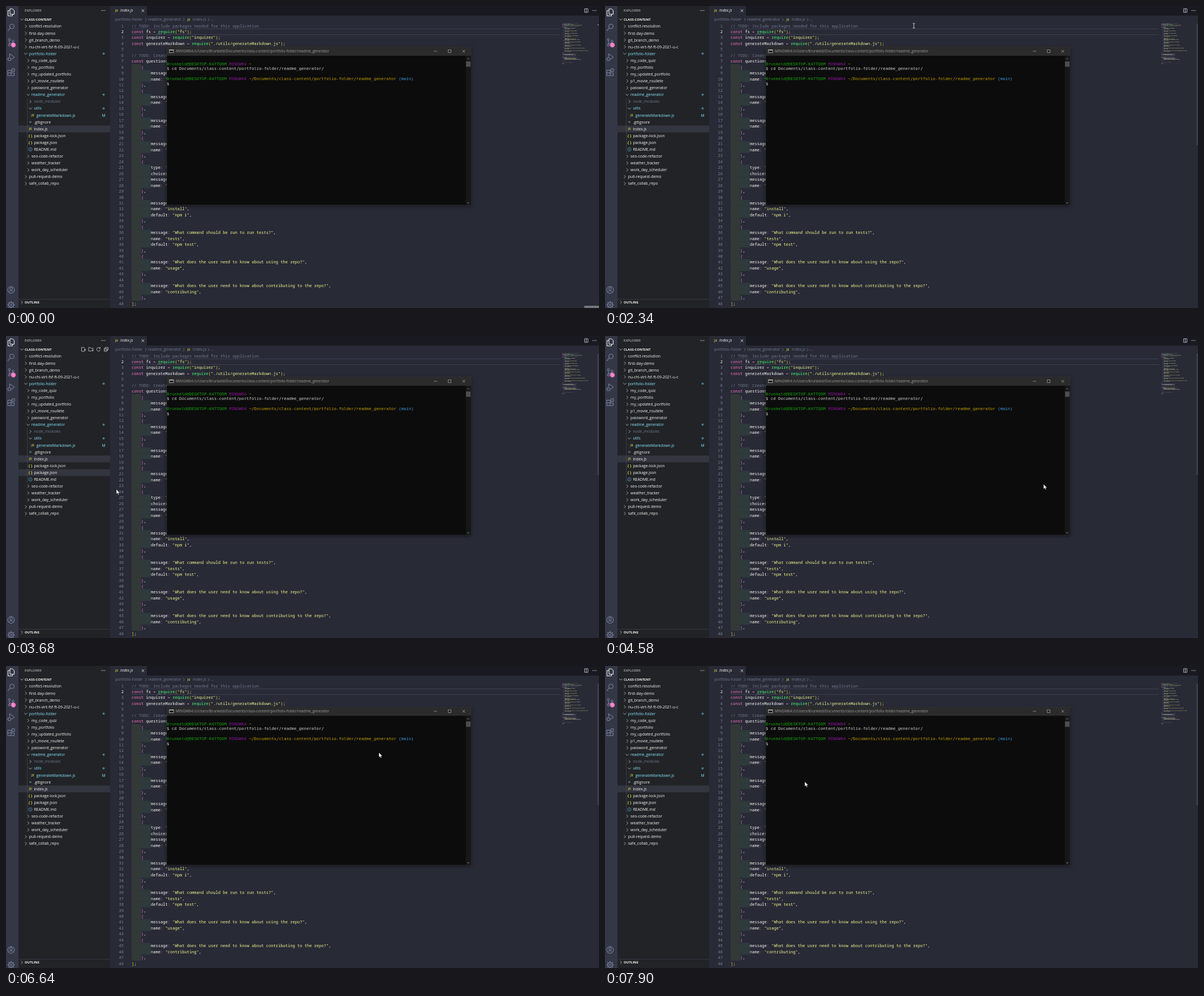
These frames come from a looping animation (1048 px wide and 534 px high, 8000 ms). An HTML page with a canvas:

```html
<!DOCTYPE html>
<html lang="en">
<head>
<meta charset="utf-8">
<title>Editor and terminal</title>
<style>
html, body { margin: 0; width: 100%; height: 100%; overflow: hidden; background: #282a36; }
canvas { display: block; }
</style>
</head>
<body>
<canvas id="stage" width="1048" height="534"></canvas>
<script>
const ctx = document.getElementById("stage").getContext("2d");
const LOOP = 8000;
const UI = '"Open Sans", "Noto Sans", sans-serif';
const MONO = '"DejaVu Sans Mono", "Liberation Mono", monospace';
const CODE_FONT = '"Noto Sans Mono", "DejaVu Sans Mono", monospace';
const C = {
  fg: "#f8f8f2", dim: "#71788c", pink: "#ff79c6", green: "#50fa7b", yellow: "#f1fa8c",
  cyan: "#8be9fd", gold: "#ffd700", orchid: "#da70d6", icon: "#8189a8", js: "#cbcb41", row: "#33353f"
};
const USER = "Brunkeld", HOST = "DESKTOP-K47TQ6M";

// ---- drawing helpers ----
function rect(x, y, w, h, color) {
  ctx.fillStyle = color;
  ctx.fillRect(x, y, w, h);
}

// Shapes glyphs at 100px and scales down, so advances stay fractional.
function text(s, x, y, color, { size = 6.8, font = UI, style = "", align = "left" } = {}) {
  ctx.save();
  ctx.translate(x, y + size * 0.36);
  ctx.scale(size / 100, size / 100);
  ctx.font = `${style} 100px ${font}`;
  ctx.textAlign = align;
  ctx.fillStyle = color;
  ctx.fillText(s, 0, 0);
  ctx.restore();
}

function path(d, x, y, color, w = 1, fill) {
  ctx.save();
  ctx.translate(x, y);
  const p = new Path2D(d);
  if (fill) { ctx.fillStyle = fill; ctx.fill(p); }
  if (w) { ctx.strokeStyle = color; ctx.lineWidth = w; ctx.stroke(p); }
  ctx.restore();
}

function circle(x, y, r, color, w) {
  ctx.beginPath();
  ctx.arc(x, y, r, 0, Math.PI * 2);
  if (w) { ctx.strokeStyle = color; ctx.lineWidth = w; ctx.stroke(); }
  else { ctx.fillStyle = color; ctx.fill(); }
}

const chevron = (x, y, open, color = "#c5c6c6") =>
  path(open ? "M-2.7-1.3L0 1.4L2.7-1.3" : "M-1.3-2.7L1.4 0L-1.3 2.7", x, y, color, 0.8);
const dots = (x, y, color) => [-2.7, 0, 2.7].forEach(d => circle(x + d, y, 0.75, color));
const cross = (x, y, r, color) =>
  path(`M${-r} ${-r}L${r} ${r}M${r} ${-r}L${-r} ${r}`, x, y, color, 0.8);
const jsIcon = (x, y) => text("JS", x, y, C.js, { size: 5.4, style: "bold", align: "center" });

// ---- code ----
const item = (...fields) => ["    {", ...fields.map(f => `        ${f},`), "    },"];
const ask = (message, name, ...rest) => item(`message: "${message}"`, `name: "${name}"`, ...rest);
const CODE = [
  "// TODO: Include packages needed for this application",
  'const fs = require("fs");',
  'const inquirer = require("inquirer");',
  'const generateMarkdown = require("./utils/generateMarkdown.js");',
  "",
  "// TODO: Create an array of questions for user input",
  "const questions = [",
  ...ask("What is your username?", "username"),
  ...ask("What is your email address?", "email"),
  ...ask("What is your project's name?", "title"),
  ...ask("Please write a short description", "description"),
  ...item('type: "list"', 'choices: ["MIT", "APACHE", "None"]',
    'message: "What kind of license should it have?"', 'name: "license"'),
  ...ask("What command should be run to install?", "install", 'default: "npm i"'),
  ...ask("What command should be run to run tests?", "tests", 'default: "npm test"'),
  ...ask("What does the user need to know about using the repo?", "usage"),
  ...ask("What does the user need to know about contributing to the repo?", "contributing"),
  "];"
];
const TAIL = [
  "", "// TODO: Create a function to write README file",
  "function writeToFile(fileName, data) {", "    return fs.writeFileSync(fileName, data);", "}", "",
  "// TODO: Create a function to initialize app", "function init() {",
  "    inquirer.prompt(questions).then((answers) => {",
  '        console.log("Generating README...");',
  '        writeToFile("README.md", generateMarkdown(answers));', "    });", "}", "", "",
  "// Function call to initialize app", "", "init();"
];
const TOKEN = /(\/\/.*)|("[^"]*")|(\bconst\b|\bfunction\b|[=:])|(\brequire\b)|([{}])|([()[\]])|[\w.]+|\S/g;
const TINT = [C.dim, C.yellow, C.pink, C.green, C.orchid, C.gold];

function tokens(line) {
  return [...line.matchAll(TOKEN)].map(m => {
    const kind = m.slice(1).findIndex(Boolean);
    return { s: m[0], col: m.index, color: kind < 0 ? C.fg : TINT[kind] };
  });
}
const LINES = CODE.map(tokens);
const MINI = [...CODE, ...TAIL].map(tokens);

const CODE_X = 222, CHAR = 4.245, PITCH = 10.447;
const lineY = i => 35 + i * PITCH;
const code = { size: CHAR / 0.6, font: CODE_FONT };

function drawEditor(t) {
  rect(184, 0, 864, 534, "#282a36");
  rect(184, 0, 864, 17, "#191a21");
  rect(184, 0, 65, 17, "#282a36");
  jsIcon(195.5, 8);
  text("index.js", 202, 8, C.fg, { style: "italic" });
  cross(242, 8.3, 2.3, C.fg);
  path("M-3-3.2H3V3.2H-3ZM0-3.2V3.2", 1025.5, 8, "#d0d1d2", 0.8);
  dots(1040, 8, "#d0d1d2");

  text("portfolio-folder", 193, 24, C.dim);
  text("readme_generator", 251, 24, C.dim);
  jsIcon(323, 24);
  text("index.js", 330, 24, C.dim);
  text("...", 362, 24, C.dim);
  [247, 314, 358].forEach(x => chevron(x, 24, false, C.dim));

  // indent guides
  LINES.forEach((_, i) => {
    const depth = CODE[i].search(/\S/) / 4;
    const y = lineY(i) - PITCH / 2;
    if (depth >= 1) rect(CODE_X, y, 17, PITCH + 0.2, "#323937");
    if (depth >= 2) rect(CODE_X + 17, y, 17, PITCH + 0.2, "#2e3a3b");
  });

  rect(CODE_X, 40, 757, 0.8, "#44475a");
  rect(CODE_X, 50, 757, 0.8, "#44475a");

  LINES.forEach((line, i) => {
    const y = lineY(i);
    text(String(i + 1), 208, y, i === 1 ? C.fg : "#7c8299", { ...code, align: "right" });
    line.forEach(k => text(k.s, CODE_X + k.col * CHAR, y, k.color, code));
  });
  [268.5, 271, 273.5].forEach(x => rect(x, 49, 1, 1, "#b0b2b0"));

  drawMinimap();
  rect(1045, 33, 3, 1, "#8e9098");
  if (t >= 500) rect(1045, 31, 3, 215, "#3b3d49");
  if (t < 40) rect(1022, 530, 26, 4, "#74767d");
}

function drawMinimap() {
  const step = 0.5477;
  ctx.globalAlpha = 0.45;
  MINI.forEach((line, i) => line.forEach(k => {
    for (const w of k.s.matchAll(/\S+/g))
      rect(983 + (k.col + w.index) * step, 30.4 + i * step * 2, w[0].length * step, 0.8, k.color);
  }));
  ctx.globalAlpha = 1;
}

// ---- side bars ----
// Each row: depth, name, kind (closed, open, js, json, git, info), flag.
const TREE = [
  [0, "conflict-resolution"], [0, "first-day-demo"], [0, "git_branch_demo"],
  [0, "nu-chi-virt-fsf-ft-09-2021-u-c"], [0, "portfolio-folder", "open"],
  [1, "my_code_quiz"], [1, "my_portfolio"], [1, "my_updated_portfolio"],
  [1, "p1_movie_roullete"], [1, "password_generator"], [1, "readme_generator", "open"],
  [2, "node_modules", "closed", "dim"], [2, "utils", "open"], [3, "generateMarkdown.js", "js", "M"],
  [2, ".gitignore", "git"], [2, "index.js", "js"], [2, "package-lock.json", "json"],
  [2, "package.json", "json"], [2, "README.md", "info"], [1, "seo-code-refactor"],
  [1, "weather_tracker"], [1, "work_day_scheduler"], [0, "pull-request-demo"], [0, "safe_collab_repo"]
];
const ROW = 12.087, ROW_Y = 36, SELECTED = 15;

function rowIcon(kind, x, y) {
  if (kind === "js") jsIcon(x, y);
  else if (kind === "json") text("{ }", x, y, C.js, { size: 6.5, style: "bold", align: "center" });
  else if (kind === "git") rect(x - 1.7, y - 1.7, 3.4, 3.4, "#4f626b");
  else if (kind === "info") {
    circle(x, y, 3, "#519aba", 0.8);
    rect(x - 0.4, y - 0.4, 0.9, 2, "#519aba");
    rect(x - 0.4, y - 1.8, 0.9, 0.8, "#519aba");
  } else chevron(x, y, kind === "open");
}

function drawExplorer(pointer) {
  rect(22, 0, 162, 534, "#212327");
  const inside = pointer && pointer.x > 22 && pointer.x < 184;
  const hovered = inside ? Math.round((pointer.y - ROW_Y) / ROW) : -1;

  text("EXPLORER", 33, 8, "#dcdcd8", { size: 6.2 });
  dots(172, 8, "#d0d1d2");
  chevron(28, 23.7, true);
  text("CLASS-CONTENT", 33, 23.7, C.fg, { size: 5.9, style: "bold" });
  if (inside) drawHeaderIcons();

  TREE.forEach(([depth, name, kind = "closed", flag], i) => {
    const y = ROW_Y + i * ROW;
    if (i === SELECTED || i === hovered) rect(22, y - ROW / 2, 162, ROW, C.row);
    const x = 35 + depth * 4.3;
    const changed = kind === "open" || flag === "M";
    rowIcon(kind, depth > 1 ? x - 0.5 : x, y);
    text(name, x + 5.8, y, changed ? C.cyan : flag === "dim" ? C.dim : C.fg);
    if (kind === "open") circle(172.5, y, 2, "#4c7a88");
    if (flag === "M") text("M", 172.5, y, C.cyan, { size: 6.8, align: "center" });
  });
  rect(37.5, 163, 0.7, 97, "#4a4c58");
  rect(42, 187, 0.6, 12, "#3c3e49");

  rect(22, 518, 162, 0.8, "#3a3c48");
  chevron(28, 524, false);
  text("OUTLINE", 33, 524, C.fg, { size: 5.9, style: "bold" });
}

function drawHeaderIcons() {
  const c = "#d0d1d2", y = 23.5;
  path("M1-3.5H-3V3.5H2.5V2M1-3.5L2.5-2V0M1.5 1H5M3.2-.8V2.8", 136.5, y, c, 0.8);
  path("M-4-3H-1L0-2H4V0M-4-3V3H1M1 2H5M3 0V4", 150, y, c, 0.8);
  path("M2.5-2A3.2 3.2 0 1 0 3.2 .5M3-4V-1.5H.5", 163.5, y, c, 0.8);
  path("M-2-1V-3.3H3.5V1.5H1.5M-3.5-1H1.5V3.5H-3.5ZM-2.5 1.2H.5", 177, y, c, 0.8);
}

function drawActivityBar() {
  rect(0, 0, 22, 534, "#343746");
  const c = C.icon, x = 9;
  path("M-2-6H2.5L5.5-3V3.5H-2ZM-2-3H-5.5V6.5H2.5V3.5", x, 11, C.fg, 1);
  circle(10.5, 36, 4, c, 1);
  path("M-1.5 2L-6 7", x, 37, c, 1.1);
  circle(6, 59.5, 1.8, c, 1);
  circle(6, 69, 1.8, c, 1);
  circle(12.5, 62, 1.8, c, 1);
  path("M-3-2.8V3M3.5-.5C3.5 2-1 1.5-3 2.5", x, 64, c, 1);
  circle(13, 69, 4.2, "#ff79c6");
  text("1", 13, 69, C.fg, { size: 5, align: "center" });
  path("M-2.5-1V-6.5L6-.5L1 3", x, 91, c, 1);
  circle(6, 94, 2.6, c, 1);
  path("M2.4 94H.8M9.5 94H11M3 97.5L4.2 96.3M9 97.5L7.8 96.3M3 90.6L4.2 91.8", 0, 0, c, 0.8);
  path("M-6-3.5H0V6H-6ZM0 1.2H5.5V6H0M-6 1.2H0M1.5-6H6V-1.5H1.5Z", x, 117, c, 1);
  circle(x, 502, 6, c, 1);
  circle(x, 500, 2.3, c, 1);
  path("M-4 4C-3 .8 3 .8 4 4", x, 502, c, 1);
  circle(x, 528.5, 4.2, c, 1);
  circle(x, 528.5, 1.6, c, 1);
  for (let i = 0; i < 8; i++) {
    const a = i * Math.PI / 4, dx = Math.cos(a), dy = Math.sin(a);
    path(`M${dx * 4.2} ${dy * 4.2}L${dx * 6.2} ${dy * 6.2}`, x, 528.5, c, 1.7);
  }
}

// ---- terminal ----
const TERM_CHAR = 4.409;
const term = { size: TERM_CHAR / 0.602, font: MONO };
const PROJECT = "Documents/class-content/portfolio-folder/readme_generator";

function drawTerminal() {
  ctx.save();
  ctx.shadowColor = "rgba(0,0,0,.5)";
  ctx.shadowBlur = 6;
  ctx.shadowOffsetY = 2;
  rect(284, 72, 538, 280, "#0c0c0c");
  ctx.restore();
  rect(284, 72, 538, 16, "#2b2b2b");
  rect(288.5, 77, 8, 6, "#c8c8c8");
  rect(289.3, 78.6, 6.4, 3.6, "#111");
  text(`MINGW64:/c/Users/${USER}/${PROJECT}`, 300, 80, "#9b9b9b", { size: 6.43 });
  rect(756, 79.6, 6, 0.8, "#9b9b9b");
  path("M-2.5-2.5H2.5V2.5H-2.5Z", 784, 80, "#9b9b9b", 0.8);
  cross(809, 80, 2.5, "#9b9b9b");

  rect(812.5, 88, 9, 264, "#171717");
  rect(813, 98, 8, 9.5, "#4d4d4d");
  path("M-2 1L0-1L2 1", 817, 93.5, "#888", 0.9);
  path("M-2-1L0 1L2-1", 817, 348, "#888", 0.9);
  path("M0 0H538V280H0Z", 284, 72, "#3a3b3e", 0.5);

  const put = (s, col, y, color = "#cccccc") => text(s, 284 + col * TERM_CHAR, y, color, term);
  const prompt = (y, dir) => {
    put(`${USER}@${HOST}`, 0, y, "#13a10e");
    put("MINGW64", 25, y, "#881798");
    put(dir, 33, y, "#c19c00");
  };
  prompt(102, "~");
  put(`$ cd ${PROJECT}/`, 0, 110.8);
  prompt(128.4, `~/${PROJECT}`);
  put("(main)", 93, 128.4, "#3a96dd");
  put("$", 0, 137.2);
}

// ---- pointer ----
const WAY = [
  [380, 1028, 530], [700, 1008, 380], [940, 975, 240], [1140, 953, 168], [1240, 930, 152],
  [1280, 910, 142], [1380, 910, 142], [1700, 765, 70], [2000, 662, 38], [2100, 655, 37], [2880, 300, 30],
  [2980, 296, 29], [3220, 214, 86], [3340, 182, 150], [3480, 150, 222], [3580, 168, 241],
  [3680, 195, 271], [3760, 195, 271], [3800, 240, 294], [3950, 400, 372], [4150, 700, 392],
  [4330, 960, 330], [4450, 910, 280], [4580, 775, 262], [4680, 765, 255], [5100, 580, 170],
  [5460, 400, 95], [5560, 335.5, 108], [5580, 335.5, 108], [5720, 165, 200], [5850, 140, 320], [6000, 200, 415],
  [6180, 380, 433], [6320, 510, 395], [6420, 520, 385], [6640, 659, 153], [6740, 659, 153],
  [6860, 640, 75], [7000, 480, 58], [7220, 215, 130], [7240, 200, 145], [7420, 150, 240],
  [7600, 190, 325], [7740, 270, 285], [7900, 353, 204.5], [8000, 353, 204.5]
];

function pointerAt(t) {
  if (t < WAY[0][0]) return null;
  const i = WAY.findIndex(w => w[0] > t);
  const [t0, x0, y0] = WAY[i - 1], [t1, x1, y1] = WAY[i];
  const k = (t - t0) / (t1 - t0);
  return { x: x0 + (x1 - x0) * k, y: y0 + (y1 - y0) * k };
}

function drawPointer({ x, y }) {
  const overTerminal = x > 284 && x < 822 && y > 72 && y < 352;
  const overCode = x > 222 && x < 980 && y > 30 && !overTerminal;
  if (overCode) path("M-2-4H-.6L0-3.5L.6-4H2M0-3.5V3.5M-2 4H-.6L0 3.5L.6 4H2", x, y, "#e8e8e8", 0.9);
  else path("M0 0V8.6L2 6.8L3.4 9.8L4.8 9.2L3.5 6.3H6.2Z", x, y, "#111", 0.5, "#fff");
}

// ---- loop ----
const HOVER_LAG = 90, TICK = 20;
let last = -1;

function frame(now) {
  const t = Math.floor((now % LOOP) / TICK) * TICK;
  if (t !== last) {
    last = t;
    drawEditor(t);
    drawExplorer(pointerAt(t - HOVER_LAG));
    drawActivityBar();
    drawTerminal();
    const pointer = pointerAt(t);
    if (pointer) drawPointer(pointer);
  }
  requestAnimationFrame(frame);
}
requestAnimationFrame(frame);
</script>
</body>
</html>
```
